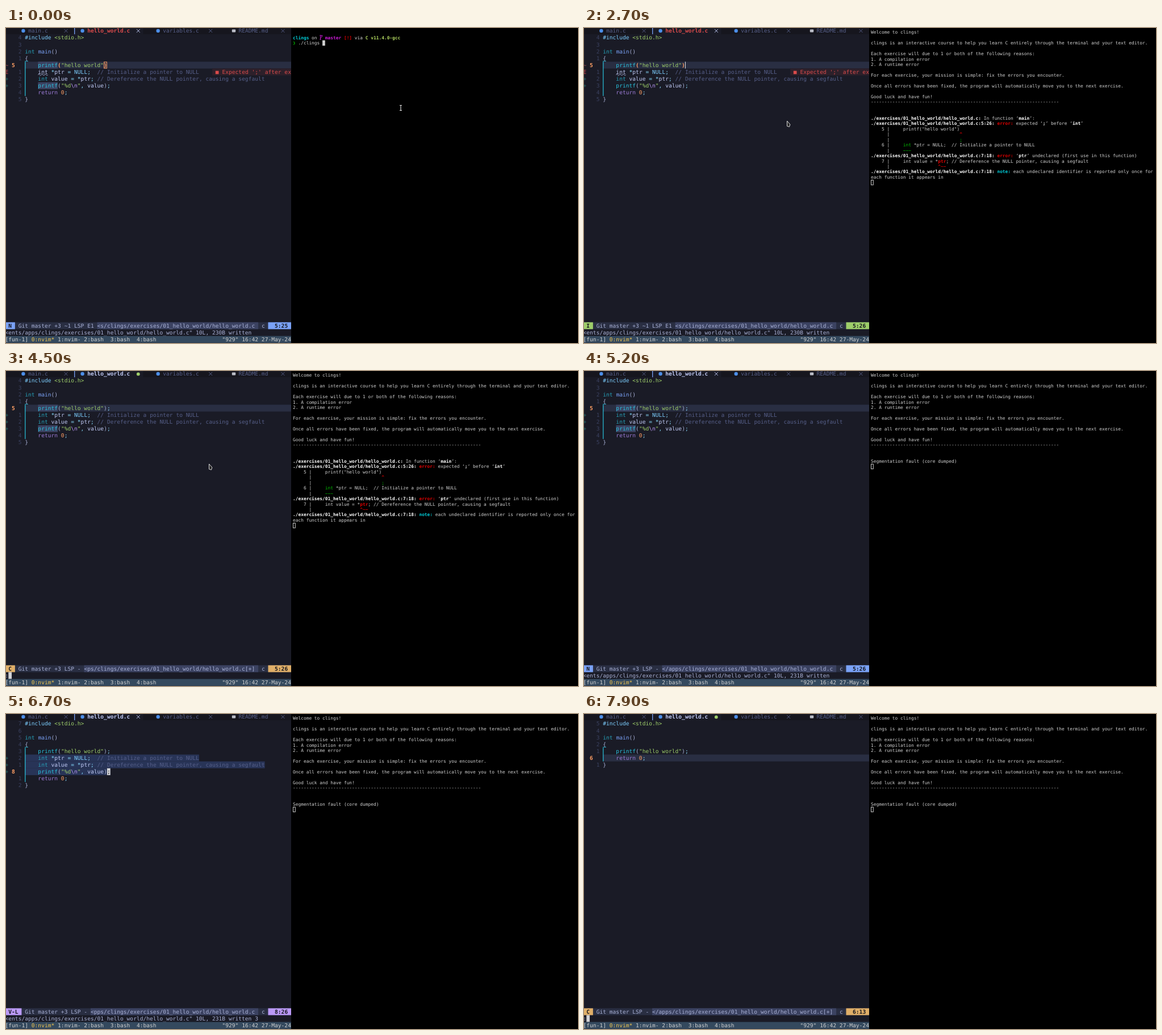
Animation of 1007 by 556 pixels, one loop 8000 ms. Source, as an HTML page:

```html
<!DOCTYPE html>
<html lang="en">
<head>
<meta charset="utf-8">
<title>Editor and terminal</title>
<style>
html, body { margin: 0; width: 100%; height: 100%; overflow: hidden; background: #000; }
svg { display: block; width: 100vw; height: 100vh; }
text { font-family: "DejaVu Sans Mono", monospace; white-space: pre; text-rendering: geometricPrecision; }
</style>
</head>
<body>
<svg id="stage" viewBox="0 0 1007 556" preserveAspectRatio="none"></svg>
<script>
const LOOP = 8000;
const stage = document.getElementById('stage');

const C = {
  bg: '#1a1b26', dark: '#16161e', line: '#292e42', gutter: '#3b4261', select: '#283457',
  fg: '#c0caf5', soft: '#a9b1d6', dim: '#565f89', cyan: '#7dcfff', op: '#89ddff',
  type: '#27a1b9', call: '#2ac3de', blue: '#7aa2f7', green: '#9ece6a', purple: '#9d7cd8',
  violet: '#bb9af7', orange: '#ff9e64', yellow: '#e0af68', red: '#db4b4b', add: '#266d6a',
  change: '#b2555b', ink: '#15161e', cursor: '#d3d3d6', bar: '#34495e', active: '#f1c550',
  grey: '#d0d0d0', white: '#ffffff', tRed: '#dd0000', tGreen: '#00c000', tCyan: '#00cdd8',
  tPink: '#cd1bd8', tLime: '#b2d860'
};

// A pane is a character grid
const pane = (x0, y0, w, h) => ({ x0, y0, w, h, size: w / 0.60205 });
const ED = pane(-1.5, -1.05, 5.787, 12.104);
const TERM = pane(505, 2.8, 4.733, 9.47);

const esc = s => s.replace(/&/g, '&amp;').replace(/</g, '&lt;');
const px = (p, col) => p.x0 + col * p.w;
const py = (p, row) => p.y0 + row * p.h;
const rect = (x, y, w, h, fill, extra = '') =>
  `<rect x="${x}" y="${y}" width="${w}" height="${h}" fill="${fill}" ${extra}/>`;
const cells = (p, row, col, n, fill) => rect(px(p, col), py(p, row), n * p.w, p.h, C[fill]);
const path = (d, stroke, width = 1, fill = 'none') =>
  `<path d="${d}" stroke="${stroke}" stroke-width="${width}" fill="${fill}"/>`;

// Runs alternate colour and text; a trailing "!" on the colour means bold
function write(p, row, col, ...runs) {
  const y = py(p, row) + (p.h - p.size * 1.164) / 2 + p.size * 0.928;
  let spans = '';
  for (let i = 0; i < runs.length; i += 2) {
    const bold = runs[i].endsWith('!') ? ' font-weight="700"' : '';
    spans += `<tspan fill="${C[runs[i].replace('!', '')]}"${bold}>${esc(runs[i + 1])}</tspan>`;
  }
  return `<text x="${px(p, col)}" y="${y}" font-size="${p.size}">${spans}</text>`;
}

function box(p, row, col, kind, color) {
  const x = px(p, col), y = py(p, row);
  if (kind === 'bar') return rect(x, y, 1.1, p.h, color);
  if (kind === 'hollow')
    return rect(x + .5, y + .5, p.w - 1, p.h - 1, 'none', `stroke="${color}"`);
  return rect(x, y, p.w, p.h, color);
}

const written = size =>
  `<ents/apps/clings/exercises/01_hello_world/hello_world.c" 10L, ${size}B written`;

const start = {
  mode: 'N', line: 5, col: 24, cur: 'hollow', ref: 1, match: 1, err: 1, semi: 0, gone: 0,
  git: '+3 ~1', mod: 0, cmd: written(230), count: '', out: 0,
  term: [2, 11, 'block'], mouse: ['beam', 695, 141]
};
const steps = [
  [500, { term: [3, 0, 'block'] }],
  [600, { term: null }],
  [1200, { term: [3, 0, 'block'] }],
  [1400, { mouse: ['beam', 590, 151] }],
  [1500, { mouse: ['arrow', 474.5, 157.5] }],
  [1600, { mouse: ['arrow', 400, 162], cur: 'block', out: 1, term: [28, 0, 'hollow'] }],
  [1700, { mouse: ['arrow', 357.5, 164] }],
  [2200, { cur: '' }],
  [2700, { mode: 'I', col: 25, cur: 'bar', ref: 0 }],
  [3100, { semi: 1, col: 26, mod: 1, match: 0 }],
  [3200, { err: 0 }],
  [3300, { git: '+3' }],
  [3700, { mode: 'N', col: 25, cur: 'block' }],
  [4000, { ref: 1 }],
  [4200, { cur: '' }],
  [4400, { cmd: ':', cur: 'cmd' }],
  [4500, { mode: 'C' }],
  [4600, { cmd: ':w' }],
  [4700, { mode: 'N', cmd: written(231), mod: 0, cur: 'block', mouse: null }],
  [4800, { out: 2, term: [17, 0, 'hollow'] }],
  [5200, { cur: '' }],
  [5700, { cur: 'block' }],
  [6100, { line: 6, ref: 0 }],
  [6500, { mode: 'V-L', count: '1' }],
  [6600, { line: 7, count: '2' }],
  [6700, { line: 8, count: '3' }],
  [7300, { mode: 'N', gone: 1, line: 6, col: 12, mod: 1, cmd: '3 fewer lines', count: '' }],
  [7400, { git: '' }],
  [7900, { mode: 'C', cmd: ':', cur: 'cmd' }]
];

function tabs(s) {
  const cross = (col, color) => {
    const x = px(ED, col) + ED.w / 2;
    return path(`M${x - 3} 2l6 6m0-6l-6 6`, color, .9);
  };
  const dot = col => `<circle cx="${px(ED, col) + 3}" cy="5" r="3.2" fill="#4c8ee8"/>`;
  const title = s.err ? 'red!' : 'fg!';
  return rect(0, 0, 502, py(ED, 1), C.dark) + cells(ED, 0, 21, 21, 'bg') +
    rect(px(ED, 21), 0, 1.3, py(ED, 1), C.blue) +
    [5, 23, 46].map(dot).join('') +
    rect(px(ED, 69), 2.6, 6.4, 4.8, '#b9bcc6', 'rx="1"') +
    write(ED, 0, 7, 'dim', 'main.c') + write(ED, 0, 25, title, 'hello_world.c') +
    write(ED, 0, 48, 'dim', 'variables.c') + write(ED, 0, 71, 'dim', 'README.md') +
    [18, 62, 84].map(c => cross(c, C.dim)).join('') +
    (s.mod ? `<circle cx="232.8" cy="5.4" r="2.9" fill="${C.green}"/>` : cross(40, C.fg));
}

function source(s) {
  const paren = s.match ? 'orange!' : 'soft';
  const lines = [
    ['cyan', '#include ', 'green', '<stdio.h>'],
    [],
    ['type', 'int ', 'blue', 'main', 'soft', '()'],
    ['soft', '{'],
    ['call', '    printf', paren, '(', 'green', '"hello world"', paren, ')', 'op', s.semi ? ';' : ''],
    [s.err ? 'fg' : 'type', '    int ', 'op', '*', 'fg', 'ptr ', 'op', '= ', 'cyan', 'NULL',
      'op', ';  ', 'dim', '// Initialize a pointer to NULL'],
    ['type', '    int ', 'fg', 'value ', 'op', '= *', 'fg', 'ptr', 'op', '; ',
      'dim', '// Dereference the NULL pointer, causing a segfault'],
    ['call', '    printf', 'soft', '(', 'green', '"%d', 'violet', '\\n', 'green', '"',
      'op', ', ', 'fg', 'value', 'soft', ')', 'op', ';'],
    ['purple', '    return ', 'orange', '0', 'op', ';'],
    ['soft', '}']
  ];
  if (s.gone) lines.splice(5, 3);
  return lines;
}

const plain = runs => runs.filter((_, i) => i % 2).join('');

function code(s) {
  const lines = source(s);
  const visual = s.mode === 'V-L';
  let out = visual ? '' : rect(px(ED, 6), py(ED, s.line), 502 - px(ED, 6), ED.h, C.line);
  if (visual)
    for (let n = 6; n <= s.line; n++) out += cells(ED, n, 6, plain(lines[n - 1]).length, 'select');
  if (s.ref) out += cells(ED, 5, 10, 6, 'gutter') + cells(ED, 8, 10, 6, 'gutter');

  lines.forEach((runs, i) => {
    const n = i + 1;
    out += n === s.line ? write(ED, n, 2, 'orange!', String(n))
      : write(ED, n, 4, 'gutter', String(Math.abs(n - s.line)));
    out += write(ED, n, 6, ...runs);
  });

  if (s.git.includes('~')) out += write(ED, 5, 0, 'change', '~');
  if (!s.gone)
    for (let n = 6; n < 9; n++)
      out += s.err && n === 6 ? write(ED, n, 0, 'red', 'E') : write(ED, n, 0, 'add', '+');

  // Scope guide
  out += rect(px(ED, 6), py(ED, 5), 1.2, (lines.length - 5) * ED.h, C.call);
  out += rect(px(ED, 6), py(ED, 5) - 1.4, ED.w, .8, C.call);

  if (s.err) {
    out += cells(ED, 6, 63, 24, 'bg') + rect(px(ED, 63), py(ED, 6), 24 * ED.w, ED.h, '#2d202a');
    out += write(ED, 6, 64, 'red', '■') + write(ED, 6, 66, 'red', "Expected ';' after ex");
    out += path(`M${px(ED, 10)} 82.6` + 'q1.45-2.2 2.9 0t2.9 0'.repeat(3), C.fg, .8);
  }

  if (s.cur && s.cur !== 'cmd') {
    out += box(ED, s.line, s.col + 6, s.cur, s.cur === 'hollow' ? C.orange : C.cursor);
    if (s.cur === 'block')
      out += write(ED, s.line, s.col + 6, 'ink', plain(lines[s.line - 1])[s.col] || ' ');
  }
  return out;
}

const modeColor = { N: 'blue', I: 'green', C: 'yellow', 'V-L': 'violet' };

function status(s) {
  const color = modeColor[s.mode];
  const info = s.mode.length + 3;
  const text = ['Git master', s.git, 'LSP', s.err ? 'E1' : '-'].filter(Boolean).join(' ');
  const from = info + text.length + 1;
  const full = 'uments/apps/clings/exercises/01_hello_world/hello_world.c' + (s.mod ? '[+]' : '');
  const file = '<' + full.slice(from - 75);
  let out = cells(ED, 43, 0, 87, 'line') + cells(ED, 43, 0, info - 1, color) +
    cells(ED, 43, from, 77 - from, 'gutter') + cells(ED, 43, 80, 7, color) +
    write(ED, 43, 1, 'ink!', s.mode) + write(ED, 43, info, 'soft', text) +
    write(ED, 43, from, 'soft', file) + write(ED, 43, 78, 'soft', 'c') +
    write(ED, 43, 82, 'ink!', `${s.line}:${s.col + 1}`);

  out += write(ED, 44, 0, 'soft', s.cmd) + write(ED, 44, 76, 'soft', s.count);
  if (s.cur === 'cmd') out += box(ED, 44, s.cmd.length, 'block', C.cursor);

  return out + rect(0, py(ED, 45), 502, ED.h, C.bar) +
    write(ED, 45, 0, 'grey', '[fun-1] ', 'active', '0:nvim*',
      'grey', ' 1:nvim- 2:bash  3:bash  4:bash') +
    write(ED, 45, 66, 'grey', '"929" 16:42 27-May-24');
}

const welcome = `Welcome to clings!

clings is an interactive course to help you learn C entirely through the terminal and your text editor.

Each exercise will due to 1 or both of the following reasons:
1. A compilation error
2. A runtime error

For each exercise, your mission is simple: fix the errors you encounter.

Once all errors have been fixed, the program will automatically move you to the next exercise.

Good luck and have fun!
${'-'.repeat(70)}`.split('\n');

const src = './exercises/01_hello_world/hello_world.c:';
const gap = '      |';
const report = [
  ['white!', src, 'grey', ' In function ‘', 'white!', 'main', 'grey', '’:'],
  ['white!', src + '5:26: ', 'tRed!', 'error: ', 'grey', 'expected ‘', 'white!', ';',
    'grey', '’ before ‘', 'white!', 'int', 'grey', '’'],
  ['grey', '    5 |     printf("hello world")'],
  ['grey', gap.padEnd(33), 'tRed!', '^'],
  ['grey', gap.padEnd(33), 'tGreen', ';'],
  ['grey', '    6 |     ', 'tGreen', 'int', 'grey', ' *ptr = NULL;  // Initialize a pointer to NULL'],
  ['grey', gap.padEnd(12), 'tGreen', '~~~'],
  ['white!', src + '7:18: ', 'tRed!', 'error: ', 'grey', '‘', 'white!', 'ptr',
    'grey', '’ undeclared (first use in this function)'],
  ['grey', '    7 |     int value = *', 'tRed!', 'ptr',
    'grey', '; // Dereference the NULL pointer, causing a segfault'],
  ['grey', gap.padEnd(25), 'tRed!', '^~~'],
  ['white!', src + '7:18: ', 'tCyan!', 'note: ',
    'grey', 'each undeclared identifier is reported only once for'],
  ['grey', 'each function it appears in']
];
const crash = [['grey', 'Segmentation fault (core dumped)']];

function prompt() {
  const x = px(TERM, 10);
  return write(TERM, 1, 0, 'tCyan!', 'clings', 'grey', ' on') +
    path(`M${x + 1.2} 13.5v6.5M${x + 3.8} 14v1.2q0 1.6-2.6 2.4`, C.tPink, .9) +
    [[1.2, 13.3], [3.8, 13.6], [1.2, 20]].map(([dx, y]) =>
      `<circle cx="${x + dx}" cy="${y}" r="1" fill="${C.tPink}"/>`).join('') +
    write(TERM, 1, 12, 'tPink!', 'master ', 'tRed!', '[!]', 'grey', ' via ',
      'tLime!', 'C v11.4.0-gcc') +
    write(TERM, 2, 0, 'tGreen!', '❯') + write(TERM, 2, 2, 'grey', './clings');
}

function terminal(s) {
  let out = rect(502, 0, 505, 556, '#000');
  if (!s.out) out += prompt();
  else {
    welcome.forEach((text, i) => out += write(TERM, i, 0, 'grey', text));
    (s.out === 1 ? report : crash).forEach((runs, i) => out += write(TERM, 16 + i, 0, ...runs));
  }
  if (s.term) out += box(TERM, ...s.term, C.grey);
  return out;
}

function pointer([kind, x, y]) {
  const shape = kind === 'beam'
    ? path('M-2-4.5h1.5l.5.5.5-.5h1.5M-2 4.5h1.5l.5-.5.5.5h1.5M0-4v8', '#e4e4e4', 1.1)
    : path('M0 0V9.3L4 10.4 5.4 6.2Z', '#d8d8d8', 1, '#2b2b2b');
  return `<g transform="translate(${x} ${y})">${shape}</g>`;
}

function render(s) {
  stage.innerHTML = rect(0, 0, 502, 556, C.bg) + tabs(s) + code(s) + status(s) +
    terminal(s) + (s.mouse ? pointer(s.mouse) : '');
}

let shown = -1;
function draw(t) {
  const past = steps.filter(([at]) => at <= t);
  if (past.length === shown) return;
  shown = past.length;
  render(Object.assign({}, start, ...past.map(([, change]) => change)));
}

const t0 = performance.now();
function tick() {
  draw((performance.now() - t0) % LOOP);
  requestAnimationFrame(tick);
}
tick();
</script>
</body>
</html>
```
